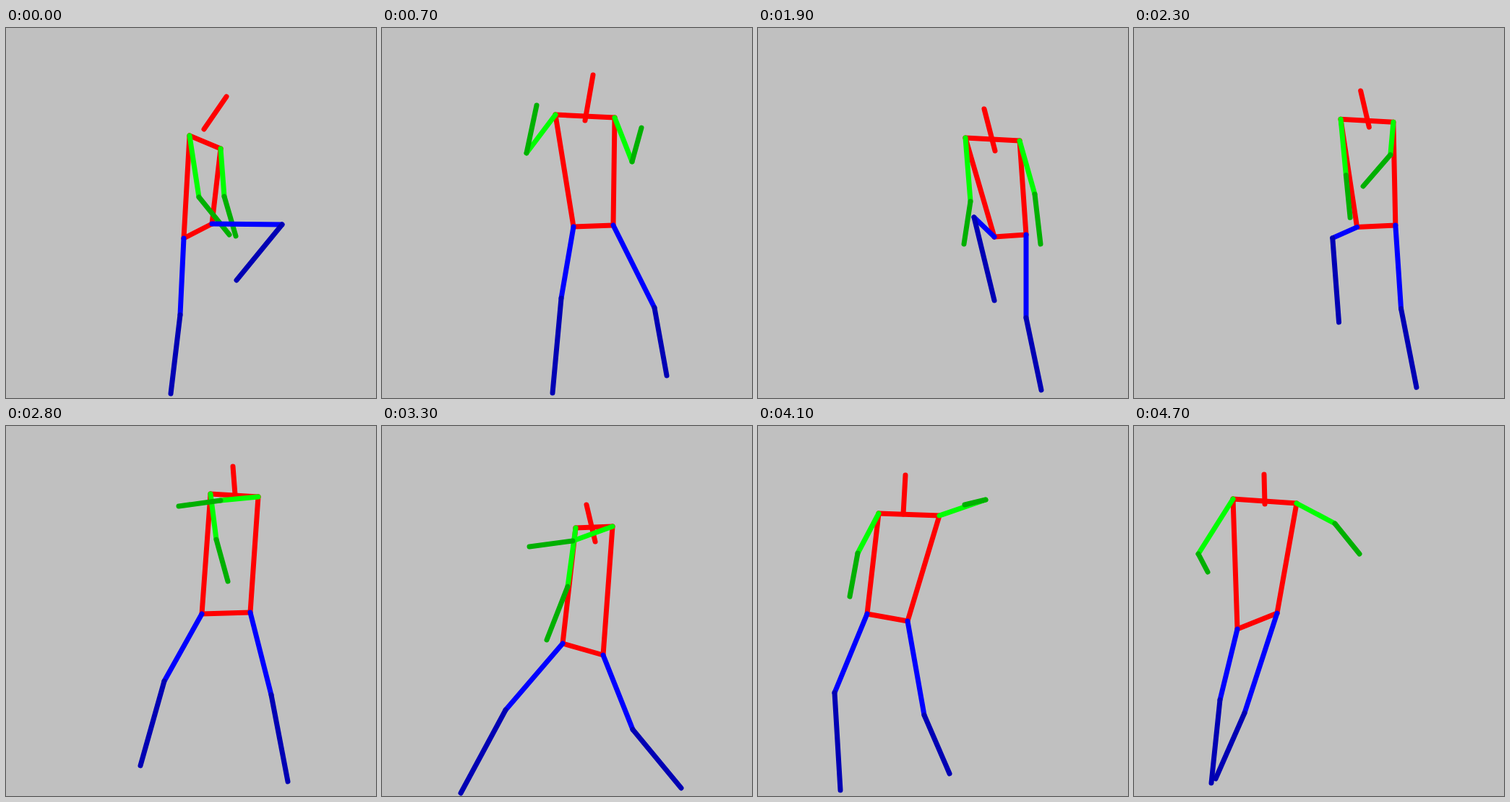
An HTML page that plays this animation: 512x512 px, repeating every 4800 ms.

```html
<!DOCTYPE html>
<html lang="en">
<head>
<meta charset="utf-8">
<title>Dancing stick figure</title>
<style>
  html, body { margin: 0; width: 100%; height: 100%; overflow: hidden; background: #c0c0c0; }
  svg { display: block; width: 100vw; height: 100vh; }
  line { stroke-width: 7; stroke-linecap: round; }
</style>
</head>
<body>
<svg id="stage" viewBox="0 0 512 512"></svg>
<script>
const LOOP = 4800, STEP = 100;
const RED = '#f00', GREEN = '#0f0', DARK_GREEN = '#00b000', BLUE = '#00f', DARK_BLUE = '#00b0';
const NAVY = '#0000b4';

// Suffix A is the limb on the left of the stage, B the one on the right.
const BONES = [
  ['head', 'neck', RED],
  ['shoulderA', 'shoulderB', RED],
  ['shoulderA', 'hipA', RED],
  ['shoulderB', 'hipB', RED],
  ['hipA', 'hipB', RED],
  ['shoulderA', 'elbowA', GREEN],
  ['shoulderB', 'elbowB', GREEN],
  ['elbowA', 'wristA', DARK_GREEN],
  ['elbowB', 'wristB', DARK_GREEN],
  ['hipA', 'kneeA', BLUE],
  ['hipB', 'kneeB', BLUE],
  ['kneeA', 'footA', NAVY],
  ['kneeB', 'footB', NAVY]
];

const tracks = {};

// A pose may be partial: joints it leaves out keep moving to their next key.
function pose(time, joints) {
  for (const [name, [x, y]] of Object.entries(joints)) {
    (tracks[name] ||= []).push({ t: time, x, y });
  }
}

pose(0, {
  head: [305, 95], neck: [274, 140],
  shoulderA: [254, 149], elbowA: [267, 234], wristA: [309, 286],
  shoulderB: [297, 167], elbowB: [302, 233], wristB: [318, 288],
  hipA: [246, 291], kneeA: [241, 397], footA: [228, 506],
  hipB: [285, 271], kneeB: [382, 272], footB: [319, 349]
});
pose(300, { footA: [230, 509] });
pose(600, { footB: [396, 476] });
pose(700, {
  head: [292, 65], neck: [281, 128],
  shoulderA: [240, 120], elbowA: [200, 173], wristA: [214, 107],
  shoulderB: [322, 124], elbowB: [346, 185], wristB: [359, 138],
  hipA: [265, 275], kneeA: [248, 374], footA: [236, 505],
  hipB: [320, 273], kneeB: [377, 387], footB: [394, 481]
});
pose(1000, { wristA: [192, 144] });
pose(1200, { wristA: [209, 196], wristB: [405, 172] });
pose(1300, { kneeA: [264, 364], footA: [246, 508] });
pose(1500, { wristB: [427, 222] });
pose(1800, { wristB: [407, 284] });
pose(1900, {
  head: [313, 112], neck: [328, 170],
  shoulderA: [287, 152], elbowA: [294, 240], wristA: [285, 299],
  shoulderB: [362, 156], elbowB: [383, 230], wristB: [391, 299],
  hipA: [327, 289], kneeA: [299, 262], footA: [327, 377],
  hipB: [371, 286], kneeB: [371, 401], footB: [392, 501]
});
pose(2800, {
  head: [314, 56], neck: [317, 95],
  shoulderA: [283, 94], elbowA: [291, 157], wristA: [307, 215],
  shoulderB: [349, 98], elbowB: [297, 103], wristB: [239, 111],
  hipA: [271, 260], kneeA: [219, 353], footA: [186, 470],
  hipB: [338, 258], kneeB: [367, 372], footB: [390, 492]
});
pose(3300, {
  head: [283, 109], neck: [295, 160],
  shoulderA: [268, 141], elbowA: [257, 222], wristA: [228, 296],
  shoulderB: [319, 139], elbowB: [264, 159], wristB: [204, 167],
  hipA: [250, 301], kneeA: [171, 393], footA: [109, 508],
  hipB: [306, 317], kneeB: [347, 420], footB: [414, 501]
});
pose(3600, { footB: [402, 499] });
pose(4100, {
  head: [204, 68], neck: [201, 122],
  shoulderA: [167, 121], elbowA: [138, 176], wristA: [127, 236],
  shoulderB: [251, 124], elbowB: [315, 102], wristB: [286, 109],
  hipA: [151, 260], kneeA: [106, 369], footA: [114, 504],
  hipB: [207, 270], kneeB: [230, 400], footB: [265, 481]
});
pose(4700, {
  head: [180, 67], neck: [181, 108],
  shoulderA: [137, 101], elbowA: [89, 177], wristA: [102, 202],
  shoulderB: [225, 107], elbowB: [278, 135], wristB: [312, 177],
  hipA: [143, 281], kneeA: [119, 379], footA: [107, 494],
  hipB: [198, 259], kneeB: [153, 397], footB: [113, 488]
});

// Upward bounces of the body: centre time, height, half width.
const BOUNCES = [[2530, 31, 270], [3810, 28, 290], [4400, 21, 300]];

function lift(t) {
  let sum = 0;
  for (const [mid, height, half] of BOUNCES) {
    const u = (t - mid) / half;
    if (Math.abs(u) < 1) sum += height * Math.cos(u * Math.PI / 2) ** 2;
  }
  return sum;
}

function liftShare(name) {
  if (name.startsWith('foot')) return 0;
  if (name.startsWith('knee')) return 0.3;
  return name.startsWith('hip') ? 0.8 : 1;
}

function slope(keys, i, axis) {
  const rate = k => (keys[k + 1][axis] - keys[k][axis]) / (keys[k + 1].t - keys[k].t);
  if (i === 0) return rate(0);
  if (i === keys.length - 1) return rate(i - 1);
  const before = rate(i - 1), after = rate(i);
  return before * after > 0 ? 2 * before * after / (before + after) : 0;
}

// Monotone cubic interpolation, so joints never overshoot a key.
function sample(keys, t, axis) {
  let i = 0;
  while (i < keys.length - 2 && t >= keys[i + 1].t) i++;
  const a = keys[i], b = keys[i + 1], span = b.t - a.t;
  const u = (t - a.t) / span, v = 1 - u;
  return a[axis] * (1 + 2 * u) * v * v + b[axis] * u * u * (3 - 2 * u)
    + span * u * v * (slope(keys, i, axis) * v - slope(keys, i + 1, axis) * u);
}

const stage = document.getElementById('stage');
const lines = BONES.map(([, , color]) => {
  const line = document.createElementNS('http://www.w3.org/2000/svg', 'line');
  line.setAttribute('stroke', color);
  return stage.appendChild(line);
});

function draw(t) {
  const rise = lift(t), at = {};
  for (const [name, keys] of Object.entries(tracks)) {
    at[name] = [sample(keys, t, 'x'), sample(keys, t, 'y') - rise * liftShare(name)];
  }
  BONES.forEach(([from, to], i) => {
    const [x1, y1] = at[from], [x2, y2] = at[to];
    for (const [key, value] of Object.entries({ x1, y1, x2, y2 })) {
      lines[i].setAttribute(key, value.toFixed(2));
    }
  });
}

const start = performance.now();
function tick() {
  const elapsed = (performance.now() - start) % LOOP;
  draw(Math.min(Math.floor(elapsed / STEP) * STEP, LOOP - STEP));
  requestAnimationFrame(tick);
}
tick();
</script>
</body>
</html>
```
